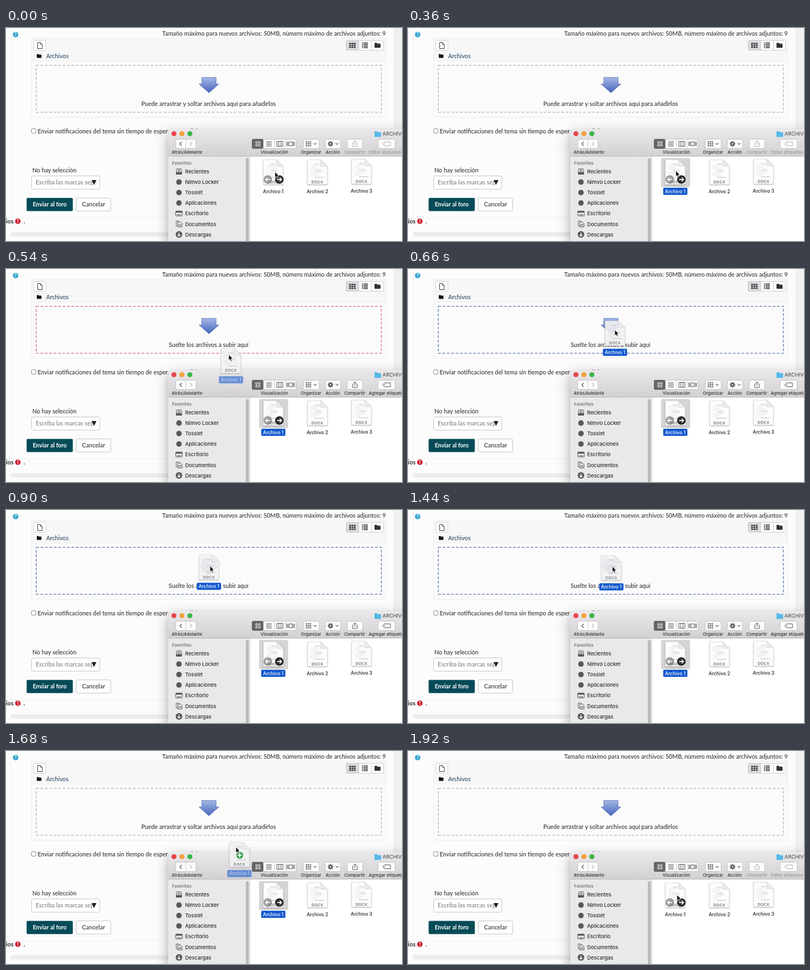
An HTML page with a canvas that plays this animation: 720x388 px, repeating every 2040 ms.

```html
<!DOCTYPE html>
<html lang="es">
<head>
<meta charset="utf-8">
<title>Arrastrar y soltar</title>
<style>
html, body { margin: 0; width: 100%; height: 100%; overflow: hidden; background: #fcfcfc; }
canvas { display: block; }
</style>
</head>
<body>
<canvas id="stage" width="720" height="388"></canvas>
<script>
const c = document.getElementById('stage').getContext('2d');
const PAGE = 'Lato, "Open Sans", sans-serif';
const UI = 'Inter, Roboto, sans-serif';
const LOOP = 2040, STEP = 60, BACK = 1440, MIRROR = 2190;

// time, x, y of the pointer tip
const PATH = [
  [300, 489, 262], [360, 487, 260], [420, 470, 239], [480, 436, 199],
  [510, 418, 175], [540, 405, 156], [600, 386, 127], [660, 376, 111],
  [720, 372, 103.5], [780, 371, 102]
];

function pointerAt(t) {
  if (t <= PATH[0][0]) return PATH[0].slice(1);
  const i = PATH.findIndex(p => p[0] >= t);
  if (i < 0) return PATH[PATH.length - 1].slice(1);
  const [t0, x0, y0] = PATH[i - 1], [t1, x1, y1] = PATH[i];
  const k = (t - t0) / (t1 - t0);
  return [x0 + (x1 - x0) * k, y0 + (y1 - y0) * k];
}

function rect(x, y, w, h, fill, stroke, r = 0) {
  c.beginPath();
  c.roundRect(x, y, w, h, r);
  if (fill) { c.fillStyle = fill; c.fill(); }
  if (stroke) { c.strokeStyle = stroke; c.lineWidth = 1; c.stroke(); }
}

function disc(x, y, r, fill) {
  c.beginPath();
  c.arc(x, y, r, 0, Math.PI * 2);
  c.fillStyle = fill;
  c.fill();
}

function trace(points, closed) {
  c.beginPath();
  points.forEach(([x, y], i) => i ? c.lineTo(x, y) : c.moveTo(x, y));
  if (closed) c.closePath();
}

function line(points, color, width = 1) {
  trace(points);
  c.strokeStyle = color;
  c.lineWidth = width;
  c.stroke();
}

function poly(points, fill, stroke, width = 1) {
  trace(points, true);
  if (fill) { c.fillStyle = fill; c.fill(); }
  if (stroke) { c.strokeStyle = stroke; c.lineWidth = width; c.stroke(); }
}

function text(str, x, y, size, color, { font = PAGE, weight = 500, align = 'left' } = {}) {
  c.font = `${weight} ${size}px ${font}`;
  c.textAlign = align;
  c.fillStyle = color;
  c.fillText(str, x, y);
}

function uiText(str, x, y, size, color, align = 'left', weight = 500) {
  text(str, x, y, size, color, { font: UI, weight, align });
}

function vertical(y0, y1, from, to) {
  const g = c.createLinearGradient(0, y0, 0, y1);
  g.addColorStop(0, from);
  g.addColorStop(1, to);
  return g;
}

function grid(x, y, cols, rows, w, h, gap, fill) {
  for (let i = 0; i < cols * rows; i++)
    rect(x + (i % cols) * (w + gap), y + Math.floor(i / cols) * (h + gap), w, h, fill);
}

function folder(x, y, w, h, fill) {
  rect(x, y, w * 0.45, h * 0.4, fill, null, 1);
  rect(x, y + h * 0.16, w, h * 0.84, fill, null, 1);
}

function chevron(x, y, dx, dy, color, width = 1.2) {
  line([[x - dx, y - dy], [x, y], [x - dx, y + dy]], color, width);
}

function caret(x, y, color) {
  line([[x - 2.5, y - 1.3], [x, y + 1.3], [x + 2.5, y - 1.3]], color, 1.1);
}

function pageOutline(x, y, w, h, fold) {
  return [[x, y], [x + w - fold, y], [x + w, y + fold], [x + w, y + h], [x, y + h]];
}

function documentIcon(cx, cy) {
  const x = cx - 18, y = cy - 23;
  c.save();
  c.shadowColor = 'rgba(0,0,0,.35)';
  c.shadowBlur = 2.5;
  c.shadowOffsetY = 1;
  poly(pageOutline(x, y, 36, 45, 12), '#fcfcfc');
  c.restore();
  poly(pageOutline(x, y, 36, 45, 12), null, '#d4d4d4', 0.7);
  for (let i = 0; i < 9; i++) {
    const heading = i % 4 === 0, start = heading ? 13 : 6;
    line([[x + start, y + 8 + i * 3], [x + start + 9 + (i * 7) % 12, y + 8 + i * 3]],
      heading ? '#a9a9ab' : '#dcdcde', 0.8);
  }
  poly([[x + 24, y], [x + 36, y + 12], [x + 24, y + 12]], '#ececec', '#cbcbcb', 0.7);
  c.letterSpacing = '0.4px';
  uiText('DOCX', cx, y + 42.5, 6.8, '#555', 'center');
  c.letterSpacing = '0px';
}

function fileLabel(str, cx, cy, selected) {
  if (selected) rect(cx - 22, cy - 6.5, 44, 13, '#1259cf', null, 2);
  uiText(str, cx, cy + 3.2, 8.6, selected ? '#fff' : '#222', 'center');
}

function quickButton(x, y, dir, fill) {
  disc(x, y, 7.8, fill);
  line([[x - 4 * dir, y], [x + 3.5 * dir, y]], '#fff', 1.8);
  chevron(x + 4 * dir, y, 3.5 * dir, 3.3, '#fff', 1.6);
}

function drawPage() {
  rect(0, 0, 720, 388, '#fcfcfc');
  rect(704, 0, 16, 388, '#f0f0f1');
  rect(9, 0, 1, 346, '#f0f0f0');
  rect(0, 345, 704, 1, '#eeeeee');
  rect(9, 372, 711, 8, '#ececec');
  rect(47, 217, 644, 1, '#f3f3f3');

  disc(17.5, 12, 5, '#35a5cf');
  text('?', 17.5, 15, 8.5, '#fff', { weight: 700, align: 'center' });
  text('Tamaño máximo para nuevos archivos: 50MB, número máximo de archivos adjuntos: 9',
    690.5, 14, 10.75, '#333', { align: 'right' });

  text('Enviar notificaciones del tema sin tiempo de espera para edición', 57.5, 191.5, 10.75, '#333');
  rect(46.5, 183.5, 8, 8, '#fff', '#8a8a8a', 1.5);

  text('No hay selección', 48, 263, 10.75, '#333');
  rect(46.5, 269.5, 124, 24, '#fff', '#c2c5c8', 2);
  c.save();
  c.beginPath();
  c.rect(47, 270, 111, 23);
  c.clip();
  text('Escriba las marcas separadas', 54, 285, 10.95, '#808080');
  c.restore();
  poly([[155.5, 277], [164.5, 277], [160, 286]], '#222');

  rect(37.5, 309.5, 84, 24, '#074b58', null, 2);
  text('Enviar al foro', 79.5, 325, 10.5, '#fff', { weight: 700, align: 'center' });
  rect(127.5, 309.5, 63, 24, '#fff', '#c0c4c8', 2);
  text('Cancelar', 159.2, 325, 10.95, '#333', { align: 'center' });

  text('ios', 0, 355.5, 10.8, '#333', { weight: 700 });
  disc(21.5, 352, 5, '#cf2233');
  text('!', 21.5, 355.3, 9, '#fff', { weight: 900, align: 'center' });
  text('.', 32, 355.5, 11, '#333', { weight: 700 });
}

function drawFilePicker(zone) {
  rect(46.5, 18.5, 644, 144, '#fbfbfb', '#ededee');
  rect(47, 19, 643, 41, '#f7f7f7');
  rect(47, 60, 643, 1, '#f0f0f0');

  rect(50.5, 22.5, 22, 18, '#fff', '#cfd2d5', 1);
  poly(pageOutline(57.5, 26.5, 8.5, 11, 3.5), '#fff', '#333');
  line([[62.5, 26.5], [62.5, 30], [66, 30]], '#333', 0.8);

  rect(618.5, 22.5, 68, 18, '#fff', '#c9ccd0', 1);
  rect(619, 23, 22, 17, '#d9dbde');
  rect(641, 23, 1, 17, '#c9ccd0');
  rect(664, 23, 1, 17, '#c9ccd0');
  grid(624, 27, 3, 3, 3.2, 2.4, 1, '#333');
  for (let i = 0; i < 4; i++) {
    rect(647, 26.5 + i * 2.8, 2, 1.6, '#333');
    rect(650, 26.5 + i * 2.8, 8, 1.6, '#333');
  }
  folder(670, 27, 11, 9, '#333');
  folder(56, 47.5, 8.5, 7, '#111');
  text('Archivos', 73, 55, 10.7, '#2b4a66');

  c.setLineDash([5, 3]);
  c.strokeStyle = { idle: '#bcbcbc', page: '#df7d95', over: '#7187bb' }[zone];
  c.lineWidth = 1.6;
  c.strokeRect(55, 68, 627.5, 85.5);
  c.setLineDash([]);

  poly([[356, 90], [382, 90], [382, 102], [387, 102], [369, 118], [351, 102], [356, 102]],
    vertical(90, 118, '#a5b8e6', '#4565bd'), '#5069ad', 0.8);
  text(zone === 'idle' ? 'Puede arrastrar y soltar archivos aquí para añadirlos' : 'Suelte los archivos a subir aquí',
    368.3, 142, 10.8, '#333', { align: 'center' });
}

function toolButton(x, w) {
  rect(x + 0.5, 202.5, w, 17, '#fbfbfb', '#c2c0c2', 3);
}

function drawToolbar(dragging) {
  const ink = '#555', soft = dragging ? ink : '#b3b3b3';
  const label = dragging ? '#333' : '#999';

  toolButton(308, 37);
  rect(326.5, 203, 1, 17, '#d0ced0');
  chevron(316, 211, -3.5, 3.5, ink);
  chevron(338, 211, 3.5, 3.5, '#bbb');

  toolButton(447, 80);
  rect(447, 202, 21, 18, '#666567', null, 3);
  for (let i = 0; i < 4; i++)
    rect(454 + (i % 2) * 5, 207 + (i >> 1) * 5, 3, 3, null, '#fff', 0.5);
  for (let i = 0; i < 4; i++) line([[473, 207 + i * 2.7], [483, 207 + i * 2.7]], ink);
  rect(492.5, 206.5, 11, 9, null, ink);
  line([[496, 206.5], [496, 215.5]], ink);
  line([[500, 206.5], [500, 215.5]], ink);
  rect(514.5, 207.5, 6, 7, null, ink);
  for (const x of [510.5, 512.5, 522.5, 524.5]) line([[x, 207], [x, 215]], ink);
  for (const x of [487.5, 507.5]) rect(x, 203, 1, 17, '#d0ced0');

  toolButton(540, 29);
  for (let i = 0; i < 3; i++) grid(545, 206.5 + i * 3.5, 3, 1, 2.6, 2, 1, ink);
  caret(562, 211, ink);

  toolButton(580, 28);
  for (let i = 0; i < 8; i++) {
    const a = i * Math.PI / 4;
    line([[590, 211], [590 + 5 * Math.cos(a), 211 + 5 * Math.sin(a)]], ink, 1.7);
  }
  disc(590, 211, 3.6, ink);
  disc(590, 211, 1.4, '#fbfbfb');
  caret(602, 211, ink);

  toolButton(620, 28);
  line([[632, 209.5], [630.5, 209.5], [630.5, 216], [638.5, 216], [638.5, 209.5], [637, 209.5]], soft);
  line([[634.5, 213], [634.5, 206]], soft);
  line([[632.2, 208], [634.5, 205.5], [636.8, 208]], soft);

  toolButton(676, 31);
  poly([[685, 211], [688, 207.5], [699, 207.5], [699, 214.5], [688, 214.5]], null, soft);
  disc(688.5, 211, 0.9, soft);

  uiText('Atrás/Adelante', 329, 228.5, 7.8, '#333', 'center');
  uiText('Visualización', 488, 228.5, 7.9, '#333', 'center');
  uiText('Organizar', 554.5, 228.5, 7.9, '#333', 'center');
  uiText('Acción', 594, 228.5, 7.9, '#333', 'center');
  uiText('Compartir', 634, 228.5, 7.9, label, 'center');
  uiText(dragging ? 'Agregar etiquetas' : 'Editar etiquetas', 659.5, 228.5, 7.9, label);
}

const ink = '#58585b', sidebar = '#e8e9eb';
const PLACES = [
  ['Recientes', y => {
    rect(310, y - 5, 9, 9, null, ink, 1);
    rect(309, y + 1, 11, 4.5, ink, null, 1);
    line([[312, y - 2.5], [317, y - 2.5]], ink);
    line([[312, y - 0.5], [317, y - 0.5]], ink);
  }],
  ['Nimvo Locker', y => disc(314.5, y, 5, ink)],
  ['Tosslet', y => disc(314.5, y, 5, ink)],
  ['Aplicaciones', y => disc(314.5, y, 5, ink)],
  ['Escritorio', y => {
    rect(308.5, y - 4.5, 12, 9, null, ink, 1);
    rect(309, y - 4, 11, 2.5, ink);
    line([[310.5, y + 2.5], [318.5, y + 2.5]], ink, 1.3);
  }],
  ['Documentos', y => {
    poly(pageOutline(309.5, y - 5.5, 7, 9, 2.5), sidebar, ink);
    poly(pageOutline(312.5, y - 3.5, 7.5, 9, 2.5), sidebar, ink);
    line([[314, y + 1], [318.5, y + 1]], ink);
    line([[314, y + 3], [318.5, y + 3]], ink);
  }],
  ['Descargas', y => {
    disc(314.5, y, 6, ink);
    line([[314.5, y - 3.5], [314.5, y + 3]], '#fff', 1.4);
    line([[311.8, y + 0.3], [314.5, y + 3.2], [317.2, y + 0.3]], '#fff', 1.3);
  }]
];

function drawWindow(selected, dragging) {
  c.save();
  c.shadowColor = 'rgba(0,0,0,.34)';
  c.shadowBlur = 22;
  c.shadowOffsetY = 8;
  rect(295, 184, 440, 220, '#fff', null, 5);
  c.restore();

  rect(295, 184, 440, 50, vertical(184, 234, '#ebe8eb', '#d3d0d3'), null, [5, 0, 0, 0]);
  rect(295, 233, 425, 1, '#b9b7b9');
  ['#e5484d', '#f2a33a', '#39b54a'].forEach((color, i) => disc(305.3 + i * 14.5, 192.5, 4.6, color));
  folder(670, 188, 12, 10.5, '#55b9e8');
  uiText('ARCHIVOS', 684.5, 196, 9.3, '#444', 'left', 400);
  drawToolbar(dragging);

  rect(295, 234, 148, 154, sidebar);
  rect(443, 234, 1, 154, '#d6d6d8');
  rect(436, 237, 5.5, 160, '#b9bbbd', null, 2.7);
  uiText('Favoritos', 302, 248.5, 7.9, '#77757a', 'left', 600);
  PLACES.forEach(([name, icon], i) => {
    const y = 261.5 + i * 19.1;
    icon(y);
    uiText(name, 325.7, y + 3.5, 9.35, '#2c2c2e');
  });

  if (selected) rect(460, 237, 53, 53, '#d5d5d5', null, 3);
  for (let i = 0; i < 3; i++) {
    const x = 486 + i * 80.2, lift = i === 2 ? 1 : 0;
    documentIcon(x, 263 - lift);
    fileLabel('Archivo ' + (i + 1), x, 297.5 - lift, selected && i === 0);
  }
  quickButton(476, 276, -1, 'rgba(120,120,120,.72)');
  quickButton(497, 276, 1, '#2c2c2c');
}

function drawCursor(x, y) {
  poly([[x, y], [x, y + 10.5], [x + 2.4, y + 8.3], [x + 4, y + 12], [x + 5.8, y + 11.2],
    [x + 4.2, y + 7.6], [x + 7.3, y + 7.4]], '#000', '#fff', 0.8);
}

function drawDrag(t, tip) {
  const [x, y] = pointerAt(t - 14);
  c.globalAlpha = 0.88;
  documentIcon(x - 2, y + 3);
  c.globalAlpha = t < 570 ? 0.58 : 1;
  fileLabel('Archivo 1', x - 2, y + 37, true);
  c.globalAlpha = 1;
  if (t > 495 && t < 525) {
    const bx = tip[0] + 7, by = tip[1] + 15;
    disc(bx, by, 7, '#fff');
    disc(bx, by, 6.2, '#2da044');
    line([[bx - 4, by], [bx + 4, by]], '#fff', 2);
    line([[bx, by - 4], [bx, by + 4]], '#fff', 2);
  }
}

function draw(now) {
  const clock = Math.floor((now % LOOP) / STEP) * STEP;
  const t = clock < BACK ? clock : MIRROR - clock;
  const tip = pointerAt(t);
  const dragging = t >= 380;
  drawPage();
  drawFilePicker(t < 525 ? 'idle' : t < 555 ? 'page' : 'over');
  drawWindow(t >= 325, dragging);
  if (dragging) drawDrag(t, tip);
  drawCursor(...tip);
}

let start;
function tick(now) {
  start ??= now;
  draw(now - start);
  requestAnimationFrame(tick);
}
requestAnimationFrame(tick);
</script>
</body>
</html>
```
